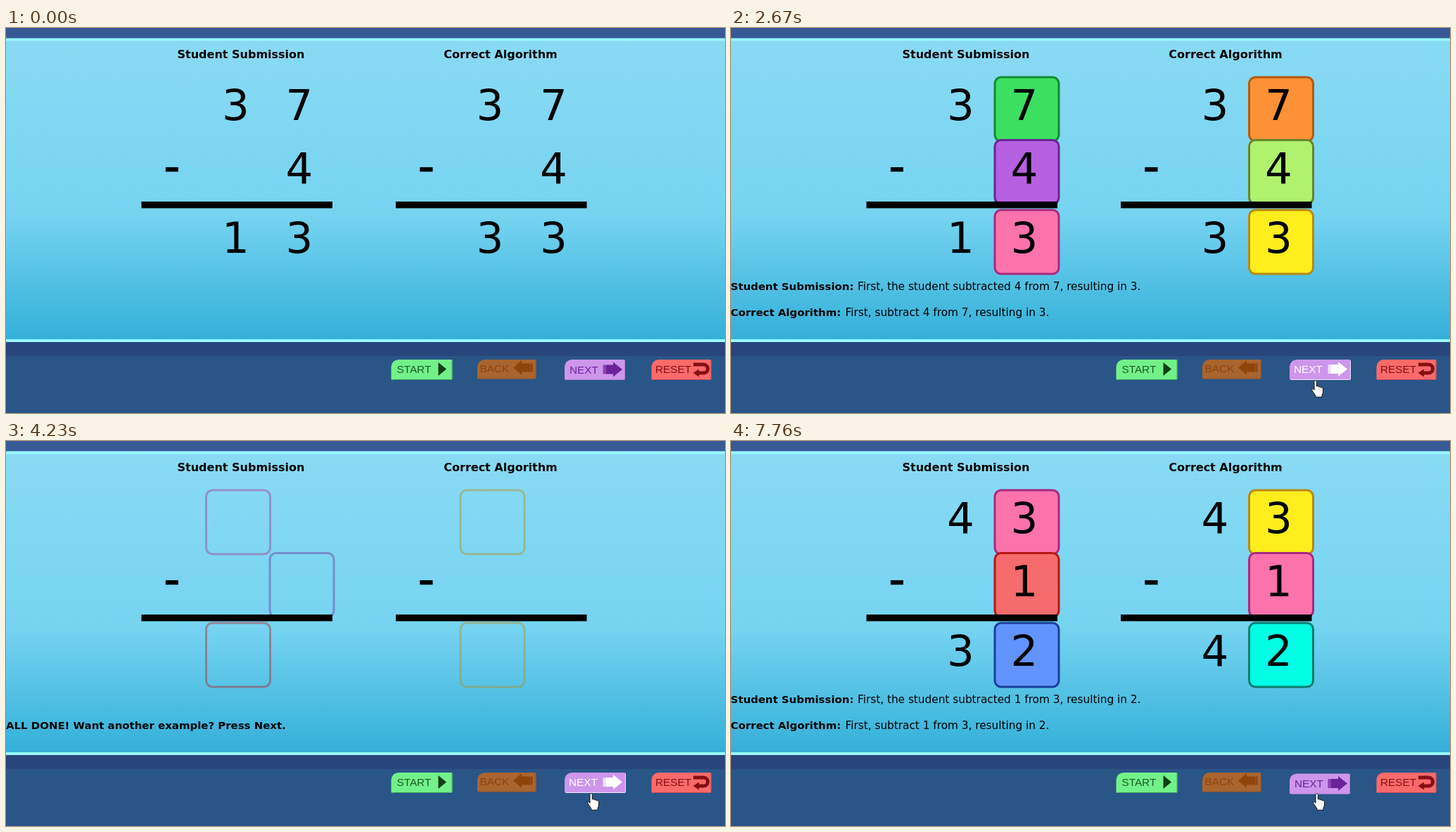
These frames come from a looping animation (1022x548 px, 8000 ms). An HTML page:

```html
<!DOCTYPE html>
<html lang="en">
<head>
<meta charset="utf-8">
<title>Subtraction walkthrough</title>
<style>
  html, body { margin: 0; width: 100%; height: 100%; overflow: hidden; background: #2a5587; }
  svg { display: block; width: 100vw; height: 100vh; }
  text { font-family: "DejaVu Sans", Verdana, sans-serif; white-space: pre; }
  .mid { text-anchor: middle; }
  .bold { font-weight: bold; font-size: 14.95px; }
  .head { font-weight: bold; font-size: 16px; }
  .digit { font-size: 61px; }
  .minus { font-size: 66px; stroke: #000; stroke-width: .8; }
  .label { font-family: "Liberation Sans", Arial, sans-serif; font-size: 15.3px; }
</style>
</head>
<body>
<svg viewBox="0 0 1022 548">
  <defs>
    <linearGradient id="sky" x1="0" y1="0" x2="0" y2="1">
      <stop offset="0" stop-color="#89daf3"/>
      <stop offset=".58" stop-color="#76d4f1"/>
      <stop offset="1" stop-color="#34b0d9"/>
    </linearGradient>
  </defs>
  <rect width="1022" height="15" fill="#375a97"/>
  <rect y="14.5" width="1022" height="433" fill="#97f8fe"/>
  <rect y="18.5" width="1022" height="424.5" fill="url(#sky)"/>
  <rect y="447" width="1022" height="20" fill="#29467c"/>
  <rect y="467" width="1022" height="81" fill="#2a5587"/>
  <text class="head mid" x="334" y="43">Student Submission</text>
  <text class="head mid" x="703" y="43">Correct Algorithm</text>
  <g id="boxes"></g>
  <path d="M192.5 251.8H464M554 251.8H825.5" stroke="#000" stroke-width="9.6"/>
  <text class="minus mid" x="236" y="219">-</text>
  <text class="minus mid" x="597.5" y="219">-</text>
  <g id="digits"></g>
  <g id="notes"></g>
  <g id="buttons"></g>
  <g id="next"></g>
  <path id="hand" fill="#fff" stroke="#111" stroke-linejoin="round"
    d="M3.5 2C3.5-.4 6.8-.4 6.8 2V8.6C7.6 7.7 9.8 8 9.9 9.5 10.7 8.6 12.7 9 12.9 10.5 13.9 9.8 16 10.2 16 12.2V16.5C16 19 14.3 20 14.3 23.8H5.8C5.8 20.5 1.8 17.5.4 14.2-.4 12 1.8 11.2 3.5 13.8Z"/>
</svg>
<script>
const LOOP = 8000, FADE = 470;
const el = id => document.getElementById(id);

// Cells: tens and ones of the top row, ones of the middle row, tens and ones of the result
const CELLS = [[0, 0], [1, 0], [1, 1], [0, 2], [1, 2]];
const BOX_Y = [70, 159.5, 259], BASE_Y = [131, 220.5, 320];

const PINK = ['#fc72ab', '#a82a80'];
const SIDES = [
  { x: 284.5, colors: { 1: ['#f66b6b', '#b81616'], 2: ['#6294ff', '#183f9c'], 3: PINK,
      4: ['#b560e0', '#6a2494'], 7: ['#3be060', '#158a32'] } },
  { x: 646, colors: { 1: PINK, 2: ['#00ffe5', '#0a7c6c'], 3: ['#ffed1c', '#b88a10'],
      4: ['#b0f26e', '#66862a'], 7: ['#fc9135', '#b55a0c'] } }
];

const first = (a, b, c) => ({ size: 15.3, lines: [
  `First, the student subtracted ${a} from ${b}, resulting in ${c}.`,
  `First, subtract ${a} from ${b}, resulting in ${c}.`] });
const second = { size: 15.12, lines: [
  'Second, the student decided to subtract the smaller value of 3 and 4 from the larger, obtaining 1.',
  'Second, copy the value 3 and place it in the highlighted result location.'] };

const ONES = ['124', '124'], NONE = ['', ''];
const SUM_A = ['37413', '37433'], SUM_B = ['43132', '43142'];
const STEPS = [
  { at: 0, sum: SUM_A, on: NONE },
  { at: 1880, sum: SUM_A, on: ONES, note: first(4, 7, 3) },
  { at: 2735, sum: SUM_A, on: ['023', '03'], note: second },
  { at: 4110, sum: NONE, on: NONE, done: true },
  { at: 5160, sum: NONE, on: NONE },
  { at: 5540, sum: SUM_B, on: NONE },
  { at: 6610, sum: SUM_B, on: ONES, note: first(1, 3, 2) }
];
const PRESSES = [[1490, 1710], [2430, 2570], [3810, 3960], [4820, 5050], [6210, 6440], [7760, LOOP]];
// Pointer stops: time, x, y
const POINTER = [[320, 838, 489], [690, 825.5, 502.5], [850, 824.5, 503], [1000, 824, 503],
  [1170, 825, 501.5], [1320, 825.5, 501.5], [3350, 826.5, 501.5], [7600, 827.5, 501.5]];

const text = (cls, x, y, str, extra = '') => `<text class="${cls}" x="${x}" y="${y}" ${extra}>${str}</text>`;

function button(x, y, w, h, fill, edge, ink, label, tx, ty, icon) {
  return `<path d="M${x} ${y + 10}q1-9 10-10h${w - 12}q2 0 2 2v${h - 4}q0 2-2 2h${4 - w}q-2 0-2-2Z" fill="${fill}"/>
    <path d="M${x + 2} ${y + h - .5}h${w - 4}q1.5 0 1.5-1.5V${y + 2}" fill="none" stroke="${edge}"/>
    ${text('label', tx, ty, label, `fill="${ink}"`)}${icon}`;
}

el('buttons').innerHTML =
  button(547.5, 472, 87, 29, '#72f189', '#3f9c62', '#1b5a25', 'START', 555.5, 491,
    '<path d="M614.5 476 626 485.5 614.5 495Z" fill="#0f3d17"/>') +
  button(670, 472, 83.5, 27.5, '#a9652f', '#8f562c', '#8a430f', 'BACK', 673.5, 489.5,
    '<path d="M721 483.5 733 473V477.5H745V489.5H733V494Z" fill="#8f450a"/><path d="M747 477.5V489.5" stroke="#8f450a" stroke-width="3"/>') +
  button(917.5, 472, 85, 29, '#fb6a6a', '#c24b5a', '#850f12', 'RESET', 923, 491,
    '<path d="M977 479H991.5C999.5 479 999.5 491 991.5 491H983" fill="none" stroke="#850f12" stroke-width="5"/><path d="M976.5 491 985 485.5V496.5Z" fill="#850f12"/>');

function nextButton(hover, pressed) {
  const white = hover && !pressed;
  const dy = pressed ? 1.5 : 0;
  const ink = white ? '#fff' : '#6b2299';
  const x = white ? 800 : 801;
  const ay = 486 + dy - (white ? .5 : 0);
  const icon = `<path d="M852.5 ${ay - 6.5}H863V${ay - 10.5}L876 ${ay} 863 ${ay + 10.5}V${ay + 6.5}H852.5Z" fill="${ink}"/>
    <path d="M850.5 ${ay - 6.5}V${ay + 6.5}" stroke="${ink}" stroke-width="4" opacity=".7"/>`;
  return button(794, 472 + dy, white ? 87 : 86, 29, '#cd96ec', white ? '#f4e6fc' : '#b486d8', ink, 'NEXT', x, 491.5 + dy - (white ? .5 : 0), icon);
}

function boxes(step, prev, t) {
  const fade = 1 - (1 - Math.min(1, (t - step.at) / FADE)) ** 3;
  let out = '';
  SIDES.forEach(({ x, colors }, s) => CELLS.forEach(([col, row], i) => {
    const on = step.on[s].includes(i);
    const was = prev && prev.on[s].includes(i);
    const alpha = on ? fade : was ? 1 - fade : 0;
    if (!on && alpha <= 0) return;
    const [fill, edge] = colors[(on ? step : prev).sum[s][i]];
    out += `<rect x="${x + col * 90.5}" y="${BOX_Y[row]}" width="91" height="91" rx="9" fill="${on ? fill : 'none'}" stroke="${edge}" stroke-opacity="${alpha.toFixed(3)}" stroke-width="3"/>`;
  }));
  return out;
}

function digits(step) {
  return SIDES.map(({ x }, s) => [...step.sum[s]].map((d, i) =>
    text('digit mid', x + 41.8 + CELLS[i][0] * 90.5, BASE_Y[CELLS[i][1]], d)).join('')).join('');
}

function notes({ note, done }) {
  if (done) return text('bold', 0, 410, 'ALL DONE! Want another example? Press Next.');
  if (!note) return '';
  return [['Student Submission:', 180, 373], ['Correct Algorithm:', 162.5, 410]].map(([title, x, y], i) =>
    text('bold', -.5, y, title) + text('', x, y, note.lines[i], `font-size="${note.size}"`)).join('');
}

function pointerAt(t) {
  const i = POINTER.findLastIndex(p => p[0] <= t);
  const a = POINTER[i], b = POINTER[1];
  if (i > 0) return a.slice(1);
  const k = 1 - (1 - (t - a[0]) / (b[0] - a[0])) ** 2;
  return [1, 2].map(n => a[n] + (b[n] - a[n]) * k);
}

const shown = {};
function put(id, html) {
  if (shown[id] !== html) el(id).innerHTML = shown[id] = html;
}

function draw(t) {
  const n = STEPS.findLastIndex(s => s.at <= t);
  const step = STEPS[n], hover = t >= POINTER[0][0];
  put('boxes', boxes(step, STEPS[n - 1], t));
  put('digits', digits(step));
  put('notes', notes(step));
  put('next', nextButton(hover, PRESSES.some(([a, b]) => t >= a && t < b)));
  el('hand').style.display = hover ? '' : 'none';
  if (hover) el('hand').setAttribute('transform', `translate(${pointerAt(t)})`);
}

const start = performance.now();
function tick() {
  draw((performance.now() - start) % LOOP);
  requestAnimationFrame(tick);
}
draw(0);
requestAnimationFrame(tick);
</script>
</body>
</html>
```
